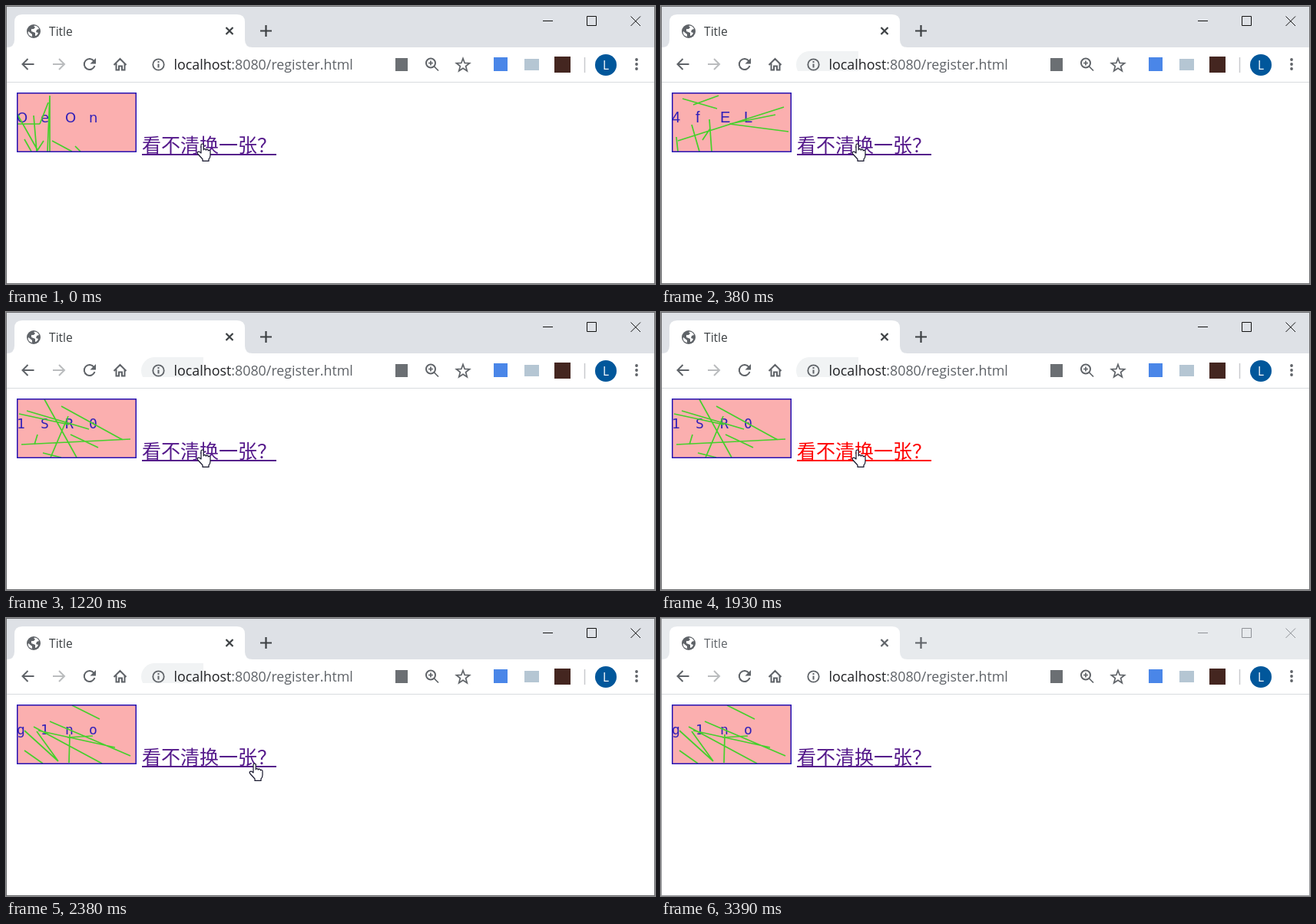
Animation, 845 px wide and 363 px high, one loop 3490 ms. Source, as an HTML page:

```html
<!DOCTYPE html>
<html lang="zh-CN">
<head>
<meta charset="utf-8">
<title>Captcha refresh</title>
<style>
html, body { margin: 0; width: 100%; height: 100%; overflow: hidden; background: #fff; }
svg { display: block; }
text { white-space: pre; }
.ui { font-family: "Open Sans", "Noto Sans", sans-serif; }
.line { fill: none; stroke: #5f6368; stroke-width: 2; }
</style>
</head>
<body>
<svg width="845" height="363" viewBox="0 0 845 363">
  <defs>
    <clipPath id="imageClip"><rect x="15" y="114" width="154" height="76"/></clipPath>
    <clipPath id="pillClip"><rect x="170" y="54" width="87" height="31"/></clipPath>
  </defs>

  <rect width="845" height="363" fill="#fff"/>
  <rect id="strip" width="845" height="54"/>
  <path d="M1 54Q11 54 11 44V21Q11 11 21 11H301Q311 11 311 21V44Q311 54 321 54Z" fill="#fff"/>

  <!-- tab -->
  <circle cx="36" cy="33" r="9" fill="#5f6368"/>
  <path d="M29 33l5 4v3c-4-1-6-4-5-7zM36 26c3-1 6 1 7 4l-3 1-1 3 3 1c-1 3-3 4-4 4v-4l-5-2v-3h3l2-2z" fill="#fff"/>
  <text id="tabTitle" class="ui" x="56" y="39" font-size="15.6">Title</text>
  <g id="tabMarks" fill="none" stroke-width="2.2">
    <path d="M286.500 28l9 9m0-9l-9 9"/>
    <path d="M331 32.500h15M338.500 25v15"/>
  </g>
  <path id="controls" d="M699 19.500h13M756.500 13.500h12v12h-12zM813.500 13.500l12.500 12.500m0-12.500l-12.500 12.500" fill="none"/>

  <!-- toolbar -->
  <rect id="pill" x="176" y="59" width="320" height="35" rx="17.500" fill="#f1f3f4" clip-path="url(#pillClip)"/>
  <path class="line" d="M36.500 76H22M28.500 69l-7 7 7 7"/>
  <path class="line" d="M61 76H75.500M69 69l7 7-7 7" style="stroke:#babcbe"/>
  <path class="line" d="M114.500 72A7 7 0 1 0 115.500 78"/>
  <path d="M117 68v7.500h-7.500z" fill="#5f6368"/>
  <path class="line" d="M140.500 77l8-8 8 8M143.500 75v8.500h3.500v-5h4v5h3.500V75"/>
  <circle class="line" cx="198.500" cy="76.500" r="7.200" style="stroke-width:1.800"/>
  <path class="line" d="M198.500 75.500v5M198.500 72v2"/>
  <text class="ui" x="218.500" y="83" font-size="17.850" fill="#202124">localhost<tspan fill="#5f6368">:8080/register.html</tspan></text>
  <rect x="507" y="68" width="16" height="17" fill="#6b6f73"/>
  <circle class="line" cx="553" cy="74.500" r="6"/>
  <path class="line" d="M557.500 79l5.500 5.500M550 74.500h6M553 71.500v6" style="stroke-width:1.700"/>
  <path id="star" class="line" style="stroke-width:1.700"/>
  <rect x="635" y="67" width="18" height="18" fill="#4a86e8"/>
  <rect x="675" y="69" width="19" height="15" fill="#b5c6d3"/>
  <rect x="714" y="66" width="21" height="21" fill="#442620"/>
  <path d="M753.500 67v20" stroke="#c8cacd" stroke-width="1.500"/>
  <circle cx="781" cy="77" r="14" fill="#01579b"/>
  <text class="ui" x="781" y="82.500" font-size="15.500" text-anchor="middle" fill="#fff">L</text>
  <g fill="#5f6368">
    <circle cx="821" cy="70" r="1.900"/><circle cx="821" cy="76" r="1.900"/><circle cx="821" cy="82" r="1.900"/>
  </g>
  <path d="M0 99.500H845" stroke="#d9dbde"/>

  <!-- page -->
  <rect x="15" y="114" width="154" height="76" fill="#fbafaf"/>
  <g clip-path="url(#imageClip)">
    <text id="code" y="152" fill="#3020b8"></text>
    <path id="scribble" fill="none" stroke="#45d02b" stroke-width="1.700"/>
  </g>
  <rect x="14.750" y="113.750" width="154.500" height="76.500" fill="none" stroke="#2411b4" stroke-width="1.500"/>
  <g id="link">
    <text x="177" y="191" font-size="25" font-weight="300" font-family="'Noto Sans CJK SC', 'Noto Sans CJK', sans-serif">看不清换一张？</text>
    <rect x="177" y="193" width="175" height="2"/>
  </g>

  <path id="cursor" fill="#fff" stroke="#15152b" stroke-width="1.200" stroke-linejoin="round"/>
  <rect id="frame" x=".5" y=".5" width="844" height="362" fill="none"/>
</svg>

<script>
const LOOP = 3490;
const $ = id => document.getElementById(id);
const set = (id, attrs) => {
  for (const name in attrs) $(id).setAttribute(name, attrs[name]);
};

const captchas = [
  { at: 0, text: "OeOn", font: "18px 'DejaVu Sans', sans-serif",
    lines: "M57 117L54 190M57 117L57 190M55 126L44 154M14 140L41 188M15 154H44M36 143L40 190M24 174L33 190M40 190L49 176M60 176L86 190M90 183L97 190" },
  { at: 260, text: "4fEL", font: "20px 'Liberation Sans', Arial, sans-serif",
    lines: "M28 121L73 134M42 129L75 117M22 176L160 132M89 154L166 164M89 154L149 142M20 171L22 190M40 155L50 190M63 148L66 190M54 175L64 160" },
  { at: 1220, text: "1SR0", font: "18px 'DejaVu Sans Mono', monospace",
    lines: "M27 129L108 153M17 133L82 147M50 114L92 190M72 123L152 167M20 173L162 166M81 136L58 190M84 160L120 177M41 160L37 173M48 184L72 190" },
  { at: 2080, text: "g1no", font: "18px 'DejaVu Sans Mono', monospace",
    lines: "M86 114L122 132M57 135L162 180M36 142L125 190M40 148L68 187M83 152L82 189M24 147L68 187M24 173L48 190M80 156L113 154M42 147L142 169" }
];

const shapes = {
  hand: "M6 13V2.600a1.600 1.600 0 0 1 3.200 0V9Q9.500 7.500 10.800 7.600T12.300 9.200Q12.800 8 14 8.200T15.300 10Q15.800 9 17 9.500T18 11.500V16Q18 19 16 21V23.400H8V21L2 14.500Q.500 12.500 1.800 11.500T4.500 11.800Z",
  arrow: "M1 1V20L5.300 16L8.500 23L11.500 21.700L8.500 15H14Z",
  beam: "M1 .600H6M3.500 .600V15.400M1 15.400H6"
};

const pointers = [
  { at: 0, shape: "hand", x: 248, y: 179 },
  { at: 2380, shape: "hand", x: 316, y: 189 },
  { at: 2530, shape: "arrow", x: 811, y: 307 },
  { at: 2680, shape: "beam", x: 614, y: 199 },
  { at: 2830 }
];

const presses = [[120, 260], [1090, 1220], [1930, 2080]];
const within = (t, [from, to]) => t >= from && t < to;
const latest = (steps, t) => steps.filter(step => step.at <= t).pop();

const starPoints = Array.from({ length: 10 }, (_, i) => {
  const angle = i * Math.PI / 5 - Math.PI / 2;
  const radius = i % 2 ? 3.8 : 9;
  return [595 + radius * Math.cos(angle), 77.5 + radius * Math.sin(angle)];
});
set("star", { d: `M${starPoints.join("L")}Z` });

function draw(t) {
  const captcha = latest(captchas, t);
  $("code").textContent = captcha.text;
  $("code").style.font = captcha.font;
  set("code", { x: [14, 45, 77, 108].join(" ") });
  set("scribble", { d: captcha.lines });

  const pressed = presses.some(span => within(t, span));
  set("link", { fill: pressed ? "#f00" : "#551a8b" });

  const pointer = latest(pointers, t);
  set("cursor", {
    d: shapes[pointer.shape] || "",
    transform: `translate(${pointer.x || 0} ${pointer.y || 0})`
  });

  const focused = t < 3390;
  set("pill", { visibility: within(t, [380, 3390]) ? "visible" : "hidden" });
  set("strip", { fill: focused ? "#dee1e6" : "#e7eaed" });
  set("tabTitle", { fill: focused ? "#3c4043" : "#5f6368" });
  set("tabMarks", { stroke: focused ? "#3c4043" : "#5f6368" });
  set("controls", { stroke: focused ? "#111" : "#8e9196" });
  set("frame", { stroke: focused ? "#6c6d70" : "#96989b" });
}

function tick() {
  draw(performance.now() % LOOP);
  requestAnimationFrame(tick);
}
tick();
</script>
</body>
</html>
```
